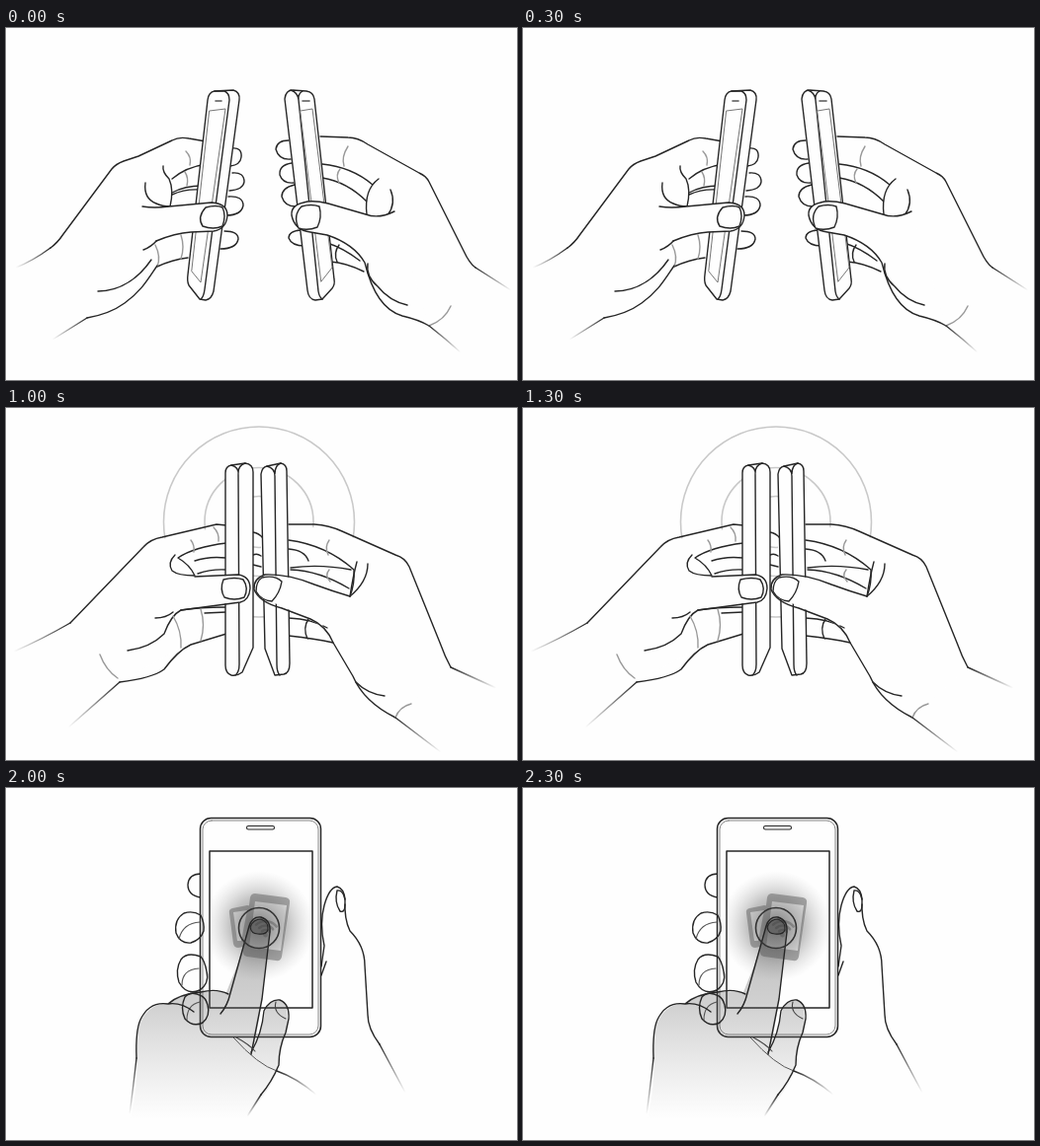
Write an HTML page with a canvas that moves like this. It is 517x357 px and loops after 2.5 s.

```html
<!DOCTYPE html>
<html lang="en">
<head>
<meta charset="utf-8">
<title>Two phones sharing</title>
<style>
html, body { margin: 0; width: 100%; height: 100%; overflow: hidden; background: #fefefe; }
canvas { display: block; }
</style>
</head>
<body>
<canvas id="stage" width="517" height="357"></canvas>
<script>
const ctx = document.getElementById('stage').getContext('2d');
const INK = '#262626', PAPER = '#fefefe', SOFT = '#999', ICON = '#a3a3a3';
const SCENE_MS = 500;
ctx.lineCap = ctx.lineJoin = 'round';

function ink(d, color = INK, width = 1.4) {
  ctx.strokeStyle = color;
  ctx.lineWidth = width;
  ctx.stroke(new Path2D(d));
}

function fill(d, color = PAPER) {
  ctx.fillStyle = color;
  ctx.fill(new Path2D(d));
}

function solid(d, color = PAPER, width = 1.4) {
  fill(d, color);
  ink(d, INK, width);
}

// A stroke that appears gradually from its first point to its last.
function fade(x1, y1, x2, y2, bend = 0) {
  const g = ctx.createLinearGradient(x1, y1, x2, y2);
  g.addColorStop(0, 'rgba(38,38,38,0)');
  g.addColorStop(1, INK);
  ink(`M${x1},${y1} Q${(x1 + x2) / 2},${(y1 + y2) / 2 + bend} ${x2},${y2}`, g);
}

function ring(x, y, r, color, width) {
  ctx.strokeStyle = color;
  ctx.lineWidth = width;
  ctx.beginPath();
  ctx.arc(x, y, r, 0, 7);
  ctx.stroke();
}

function roundBox(x, y, w, h, r, color, width, paint) {
  ctx.beginPath();
  ctx.roundRect(x, y, w, h, r);
  if (paint) { ctx.fillStyle = paint; ctx.fill(); }
  if (color) { ctx.strokeStyle = color; ctx.lineWidth = width; ctx.stroke(); }
}

function phonesApart() {
  // left hand
  solid('M229,122 Q239,121 238,131 Q237,139 227,140 M229,147 Q241,146 241,156 Q240,164 226,165');
  solid('M225,171 Q240,170 240,180 Q238,190 223,190 M221,206 Q235,206 235,214 Q233,224 217,224');
  fade(10, 243, 45, 223, 3);
  ink('M45,223 Q52,218 58,209 L107,143 Q111,138 119,135 L134,130 L168,114 Q175,110 185,112 L202,115');
  ink('M203,138 Q182,141 168,153 M159,140 Q158,146 165,153 Q170,164 166,181 M141,157 Q139,173 152,178 Q158,181 166,181');
  ink('M168,167 Q181,160 198,160 M168,169 Q181,163 196,164');
  ink('M182,125 Q188,131 186,139 M181,146 Q185,152 183,160', SOFT);
  ink('M93,267 C118,267 136,251 147,235 M139,225 Q147,222 153,215 M153,242 Q168,235 184,233');
  ink('M151,220 Q157,232 153,242 M177,210 Q181,222 177,234', SOFT);
  fade(47, 316, 82, 294);
  ink('M82,294 Q105,290 120,279 C137,267 144,254 153,241');
  solid('M204,73 Q205,65 211,64 L230,63 Q237,65 236,73 L210,267 Q208,275 202,276 L196,275 L185,261 Q183,257 184,250 Z');
  ink('M211,64 L221,64 Q226,66 226,73 L201,265 Q200,273 197,275');
  ink('M206,84 L222,82 L197,258 L188,247 Z', '#777', 1);
  ink('M212,74 L218,74', '#555', 1.6);
  solid('M138,181 Q150,183 165,181 L208,177 Q224,178 224,190 Q223,204 210,206 L187,207 Q171,208 152,216');
  solid('M202,182 Q213,179 219,182 Q223,190 219,201 Q210,205 199,201 Q193,192 202,182 Z');

  // right hand
  solid('M286,114 Q274,114 273,123 Q276,134 288,133 M289,137 Q276,139 277,149 Q280,158 291,157');
  solid('M292,159 Q279,162 279,171 Q282,181 293,181 M298,205 Q286,206 286,213 Q289,221 302,221');
  fade(511, 266, 475, 243, 0);
  ink('M475,243 Q469,239 463,226 L428,156 Q425,150 418,147 L366,118 Q356,111 346,111 L318,110');
  ink('M320,138 Q350,141 371,159 M320,152 Q345,156 365,176 M377,153 Q362,164 365,189 M389,164 Q395,178 386,190');
  ink('M346,120 Q339,131 342,140 M338,143 Q333,149 337,157', SOFT);
  ink('M325,218 Q341,223 358,236 M328,237 Q344,238 362,247 M337,220 Q331,228 335,237');
  solid('M282,72 Q283,63 290,63 L304,64 Q311,65 312,72 L332,255 Q333,260 330,264 L320,275 L313,276 Q306,275 305,266 Z');
  ink('M288,63 Q295,65 296,73 L316,267 Q317,273 320,275 M296,73 Q295,67 300,64');
  ink('M298,84 L310,82 L330,243 L319,257 Z', '#777', 1);
  ink('M300,74 L307,74', '#555', 1.6);
  solid('M393,186 Q377,194 364,189 L326,178 Q310,174 301,177 Q288,180 289,190 Q292,205 308,207 L325,210 Q352,219 363,238 C369,263 380,286 401,292 Q418,296 428,302');
  solid('M299,181 Q309,178 317,181 Q320,192 315,202 Q305,206 296,203 Q290,190 299,181 Z');
  ink('M366,239 Q364,252 376,262 Q388,277 406,281');
  ink('M428,302 Q444,296 450,282', SOFT);
  fade(460, 329, 428, 302, -1);
}

function phonesTurning() {
  // left hand
  for (const [y, h] of [[130, 20], [156, 18], [182, 18], [217, 18]]) {
    solid(`M238,${y} Q252,${y} 252,${y + h / 2} Q251,${y + h} 238,${y + h}`);
  }
  fade(10, 245, 50, 222, 2);
  ink('M50,222 Q58,216 66,206 L123,148 Q130,139 140,137 L198,122 L211,122');
  ink('M210,135 Q184,139 164,151 Q179,161 180,174 M155,149 Q149,158 155,167 Q158,175 165,178');
  ink('M172,135 Q180,143 179,155 M177,159 Q193,152 211,151 M180,169 Q194,162 211,162 M191,154 L192,172');
  fade(62, 323, 105, 282, 0);
  ink('M105,282 Q137,278 147,262 Q156,246 166,241 Q184,235 211,232 M187,208 Q188,222 184,236 M156,216 Q166,230 163,242');
  ink('M81,253 Q107,252 127,239 Q147,229 155,213 Q170,205 211,205 M188,214 L211,211');
  ink('M81,254 Q86,270 100,279', SOFT);
  solid('M210,70 Q211,61 218,61 L229,61 L240,75 L239,262 L226,276 L218,277 Q211,275 211,267 Z');
  ink('M216,61 Q222,64 221,73 L218,276 M222,61 Q219,63 220,68');
  fill('M165,178 L220,173 Q234,175 234,187 Q233,202 220,203 L188,205 Z');
  ink('M153,174 Q165,180 180,176 L220,173 Q234,175 234,187 Q233,202 220,203 L188,205');
  solid('M207,178 Q221,175 228,179 Q232,189 227,197 Q217,201 207,197 Q202,188 207,178 Z');

  // right hand
  fade(510, 290, 462, 265, 0);
  ink('M462,265 C445,230 428,195 415,159 Q408,151 397,148 L350,127 Q335,121 322,120 L299,122');
  ink('M300,137 Q328,140 347,151 Q358,158 360,171 L357,191 M338,135 Q335,143 338,149 M301,149 Q323,148 344,156');
  ink('M302,161 Q330,157 359,165 M302,163 Q330,168 357,184 M360,171 Q373,168 375,153 M378,160 Q379,180 357,192 M338,164 Q335,171 340,177');
  ink('M302,217 Q320,217 334,226 M302,233 Q325,233 340,238 M315,219 Q309,227 316,234');
  solid('M269,70 Q270,63 276,62 L292,64 Q299,65 299,72 L302,257 L286,276 L278,277 Q273,274 273,267 Z');
  ink('M273,63 Q281,65 281,74 L285,267 L283,276');
  ink('M284,84 L298,82 L301,247 L289,260 Z', '#777', 1);
  ink('M287,74 L293,74', '#555', 1.6);
  fill('M357,192 L292,171 Q275,168 266,173 Q260,180 264,189 Q273,199 290,205 L320,218 Z');
  ink('M357,192 L334,186 L300,173 Q279,167 268,171 Q260,177 262,185 Q269,197 287,203 L319,217 C344,228 351,269 370,285 Q383,303 405,314');
  solid('M271,172 Q281,170 289,176 Q287,190 279,198 Q270,197 264,188 Q264,177 271,172 Z');
  ink('M367,281 Q377,291 394,292 M405,314 Q407,303 420,298');
  fade(457, 346, 405, 314, 0);
}

function phonesTouching() {
  for (const r of [96.5, 55, 26]) ring(256, 115.5, r, '#c9c9c9', 1.6);

  // paper behind both hands hides the waves
  fill('M65,218 L144,136 L222,119 L250,125 L250,201 L222,230 L175,244 L115,278 Z');
  fill('M450,263 L407,159 L336,124 L286,118 L258,126 L258,201 L331,238 L394,314 Z');
  ink('M250,126 Q256,127 260,132 M250,149 Q254,147 258,150 M250,159 L258,161');

  // left hand
  fade(8, 247, 65, 218, 2);
  ink('M65,218 L139,141 Q146,133 158,131 L213,118 L223,119');
  ink('M223,137 Q190,141 174,152 Q186,159 191,170 M171,149 Q163,157 168,165 Q174,170 191,170');
  ink('M191,155 Q205,150 223,152 M194,168 Q208,163 223,164');
  ink('M187,134 Q191,139 190,146 M210,121 Q216,127 215,135', SOFT);
  ink('M123,246 Q146,243 160,229 Q167,210 177,205 Q195,202 223,202 M151,213 Q162,213 169,207 M201,208 L223,207');
  fade(63, 324, 115, 278, 0);
  ink('M115,278 Q148,274 160,265 Q174,246 187,240 L223,229');
  ink('M169,211 Q178,226 177,243 M197,204 Q202,220 197,236', SOFT);
  ink('M95,250 Q101,266 113,274', SOFT);
  solid('M222,66 Q222,59 228,58 L242,56 Q250,57 250,65 L250,243 L239,268 Q234,272 228,271 Q222,269 222,261 Z');
  ink('M228,58 Q236,60 235,68 L236,260 Q236,268 232,271 M235,66 Q235,58 242,56');
  fill('M180,173 L239,169 Q247,173 247,183 Q246,196 237,197 L180,202 Z');
  ink('M191,171 L235,169 Q247,171 247,183 Q246,195 237,197 L177,205');
  solid('M220,174 Q232,171 240,174 Q246,183 241,192 Q231,196 221,192 Q216,184 220,174 Z');

  // right hand
  fade(496, 284, 450, 263, 0);
  ink('M450,263 Q444,252 439,238 L408,161 Q404,152 394,149 L340,125 Q327,119 312,118 L286,118');
  ink('M286,134 Q324,139 352,164 Q353,178 348,191 M286,143 Q302,144 306,155');
  ink('M288,162 Q318,158 349,164 M288,164 Q317,165 347,183 M355,156 Q351,171 348,191 M366,158 Q366,176 348,191');
  ink('M327,134 Q322,141 326,149 M327,164 Q322,170 328,176', SOFT);
  ink('M286,213 Q310,214 325,223 M286,231 Q313,234 331,238 M306,214 Q300,223 305,234');
  solid('M258,67 Q259,60 264,59 L278,56 Q284,57 284,64 L287,259 Q287,269 281,270 L272,271 L262,244 Z');
  ink('M264,59 Q272,61 272,69 L274,260 Q274,268 277,271 M272,67 Q272,58 278,56');
  fill('M345,192 L290,172 L258,169 Q249,180 254,190 L281,202 L320,221 Z');
  ink('M348,191 Q331,186 312,179 Q285,168 262,169 Q250,173 251,184 Q256,197 279,203 L308,214 Q324,221 331,238 L351,272 Q362,298 394,314');
  solid('M259,172 Q272,169 279,176 Q277,188 269,196 Q258,195 253,186 Q253,176 259,172 Z');
  ink('M354,278 Q366,290 383,292');
  ink('M394,314 Q398,303 410,300', SOFT);
  fade(440, 349, 394, 314, 0);
}

function icon() {
  fill('M229,122 L244,119 Q248,119 247,123 L240,161 L235,162 Q231,162 230,158 L226,127 Q225,123 229,122 Z', ICON);
  fill('M230,126 L244,124 L238,155 L234,155 Z');
  fill('M252,107 L283,111 Q288,112 287,117 L279,171 Q278,176 273,175 L244,171 Q239,170 240,165 L247,111 Q248,107 252,107 Z', ICON);
  fill('M252,115 L284,119 L278,165 L246,161 Z');
  ctx.save();
  ctx.translate(262.5, 149);
  ctx.rotate(0.1);
  for (const r of [5, 9.5, 14]) {
    ctx.strokeStyle = ICON;
    ctx.lineWidth = 2.6;
    ctx.beginPath();
    ctx.arc(0, 0, r, -2.4, -0.75);
    ctx.stroke();
  }
  ctx.fillStyle = ICON;
  ctx.beginPath();
  ctx.arc(0, 0, 2.4, 0, 7);
  ctx.fill();
  ctx.restore();
}

function holdingHand() {
  ink('M319,190 L324,176 M319,181 L322,160 Q317,137 322,119 Q327,101 335,100 Q342,102 343,113 Q342,133 348,145 Q363,160 363,180 L366,230 Q366,244 378,260');
  fade(404, 309, 378, 260, 0);
  ink('M335,104 Q332,116 338,125 Q343,127 343,118 M335,104 Q341,103 343,113');
  ink('M230,253 Q255,281 274,287', '#555', 1);
  fade(314, 311, 274, 287, -5);
  solid('M197,87 Q185,87 184,98 Q184,109 197,111');

  roundBox(196.5, 30.5, 122, 222, 11, INK, 1.5, PAPER);
  roundBox(199, 33, 117, 217, 9, '#888', 1);
  roundBox(243.5, 38.5, 28, 3.5, 2, INK, 1.1);
  roundBox(206, 64, 104, 159, 0, INK, 1.5);
}

function holdingFingers() {
  ink('M197,129 Q189,124 180,127 Q170,133 172,147 Q176,158 187,157 Q197,154 200,145 Q201,137 197,129');
  ink('M197,171 Q183,166 177,174 Q171,184 175,197 Q183,211 196,205 Q206,198 203,186 Q201,175 197,171');
  ink('M198,211 Q187,205 181,212 Q176,223 181,234 Q189,243 199,238 Q207,231 204,220 Q202,213 198,211');
  ink('M175,153 Q179,137 196,136 M178,200 Q178,184 195,183 M183,235 Q183,220 196,217', '#555', 1.1);
}

// The pointing hand is grey glass that dissolves towards the wrist.
function glass(d, top, bottom) {
  const g = ctx.createLinearGradient(0, top, 0, bottom);
  g.addColorStop(0, 'rgba(70,70,70,.38)');
  g.addColorStop(.45, 'rgba(90,90,90,.27)');
  g.addColorStop(1, 'rgba(120,120,120,0)');
  fill(d, g);
}

function nail(d, shade) {
  fill(d, shade);
  ink(d, INK, 1.2);
}

function pointing() {
  holdingHand();
  icon();
  glass('M214,178 Q217,169 226,169 Q235,171 235,181 L227,230 L222,286 Q228,260 240,253 Q250,254 249,266 Q254,281 247,305 L238,342 L99,342 L104,282 Q109,260 132,256 Q145,247 166,246 Q179,238 194,240 Z', 170, 342);
  holdingFingers();
  ink('M190,266 L205,213 L214,178 Q217,169 226,169 Q235,171 235,181 L228,226 L217,300');
  nail('M216,178 Q218,173 226,172 Q233,174 233,181 Q231,187 224,187 Q216,185 216,178 Z', 'rgba(60,60,60,.25)');
  ink('M205,241 Q190,236 177,241 Q172,245 163,247 Q144,246 132,257 Q113,257 107,275 L104,285 M164,247 Q178,247 188,255');
  fade(98, 328, 104, 285, 0);
  ink('M217,304 Q223,296 225,286 Q229,259 240,254 Q249,254 249,264 Q255,280 250,293 Q246,302 244,310');
  ink('M241,257 Q239,267 249,271 M230,262 Q230,274 226,284', '#444', 1.1);
  fade(238, 332, 244, 310, 0);
}

function pressing() {
  holdingHand();
  icon();
  const glow = ctx.createRadialGradient(256, 140, 8, 256, 140, 56);
  glow.addColorStop(0, 'rgba(95,95,95,.66)');
  glow.addColorStop(.45, 'rgba(125,125,125,.44)');
  glow.addColorStop(1, 'rgba(180,180,180,0)');
  ctx.fillStyle = glow;
  ctx.fillRect(200, 84, 112, 112);

  glass('M246,140 Q249,130 258,131 Q268,134 267,146 L259,215 L252,258 Q260,244 263,222 Q269,213 280,216 Q287,225 284,242 L275,283 Q269,304 253,322 L244,336 L126,336 Q134,300 132,274 L134,244 Q141,219 164,218 Q173,209 196,206 L223,207 L234,180 Z', 130, 336);
  holdingFingers();
  ink('M217,229 Q224,221 227,208 L246,140 Q249,130 258,131 Q268,134 267,146 L259,214 L248,270');
  nail('M247,141 Q250,133 258,133 Q266,136 265,144 Q263,149 255,148 Q248,148 247,141 Z', 'rgba(50,50,50,.28)');
  ring(256, 142, 20.5, '#333', 1.6);
  ink('M225,209 Q213,203 197,207 Q175,209 164,219 Q145,216 136,235 Q131,246 132,274 M164,219 Q177,217 190,227');
  fade(125, 331, 132, 274, 3);
  ink('M248,268 Q259,249 261,226 Q267,214 277,215 Q287,219 286,234 L283,248 Q276,263 276,281 Q269,298 258,311');
  ink('M273,217 Q270,228 283,234 M233,253 Q246,260 252,267', '#444', 1.1);
  fade(244, 333, 258, 311, 0);
}

const scenes = [phonesApart, phonesTurning, phonesTouching, pointing, pressing];
const start = performance.now();

function render() {
  const elapsed = Math.max(0, performance.now() - start);
  ctx.fillStyle = PAPER;
  ctx.fillRect(0, 0, 517, 357);
  scenes[Math.floor(elapsed / SCENE_MS) % scenes.length]();
  requestAnimationFrame(render);
}
render();
</script>
</body>
</html>
```
